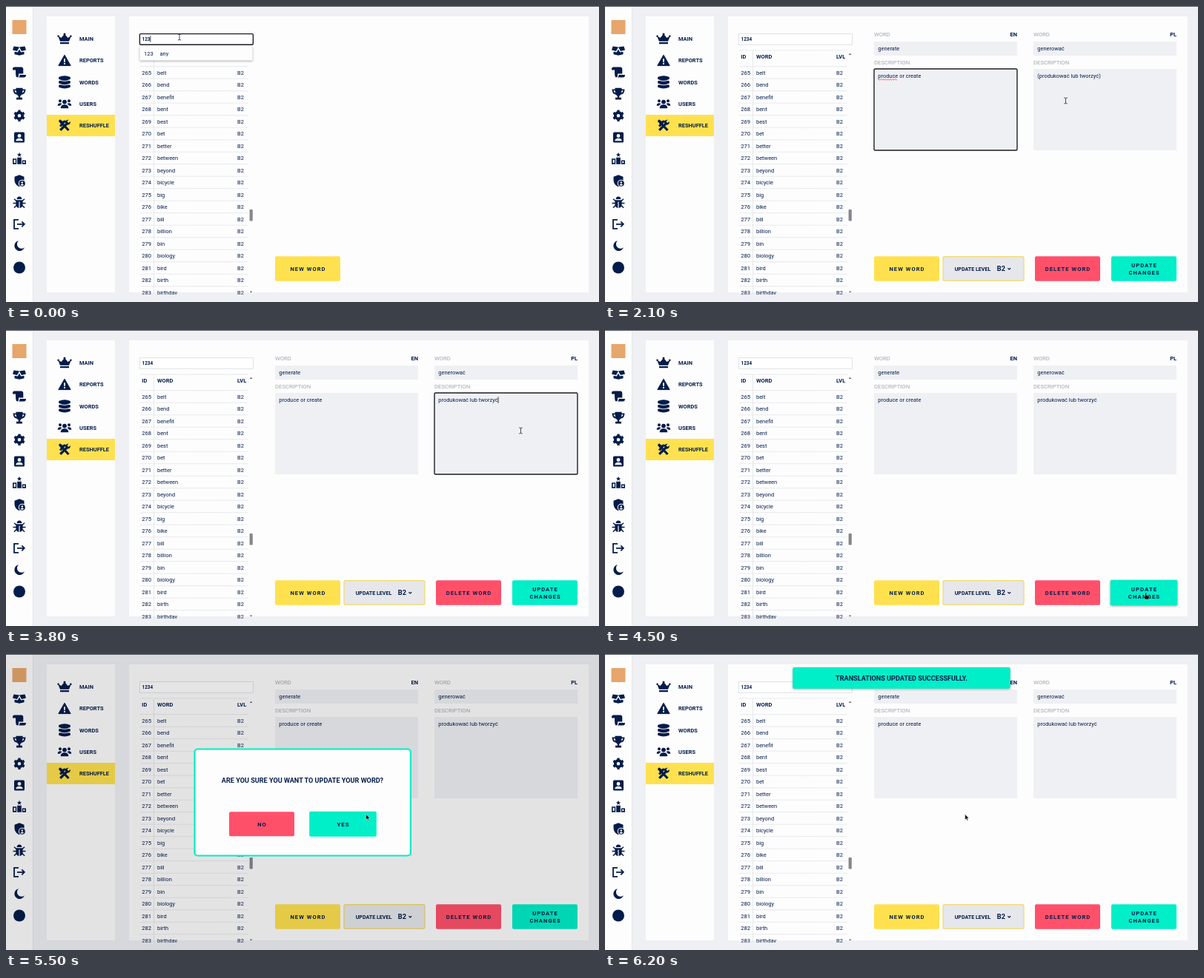
Animation of 800 by 400 pixels, one loop 6250 ms. Source, as an HTML page:

```html
<!DOCTYPE html>
<html lang="en">
<head>
<meta charset="utf-8">
<title>Word editor</title>
<style>
  html, body { margin: 0; width: 100%; height: 100%; overflow: hidden; background: #eff0f4; }
  svg { display: block; width: 800px; height: 400px; font: 7.45px Roboto, sans-serif; fill: #041c4a; }
  .b { font-weight: 700; }
  .btn { font-weight: 700; font-size: 7.6px; letter-spacing: 1.03px; text-anchor: middle; }
  .big { font-weight: 700; font-size: 9.1px; text-anchor: middle; }
  .label { fill: #a3a5ab; font-size: 7.7px; }
  .line { fill: none; stroke: #041c4a; stroke-width: 1.8; }
  .soft { filter: drop-shadow(0 1px 1.5px #0005); }
</style>
</head>
<body>
<svg id="stage" viewBox="0 0 800 400"></svg>
<script>
const LOOP = 6250;
const NAVY = '#041c4a', TEAL = '#00eec8', RED = '#ff506a', YELLOW = '#ffe14f', FIELD = '#eff0f4';

const text = (x, y, s, attrs = '') => `<text x="${x}" y="${y}" ${attrs}>${s}</text>`;
const rect = (x, y, w, h, fill, attrs = '') =>
  `<rect x="${x}" y="${y}" width="${w}" height="${h}" fill="${fill}" ${attrs}/>`;
const path = (d, attrs = '') => `<path d="${d}" ${attrs}/>`;
const circle = (x, y, r, attrs = '') => `<circle cx="${x}" cy="${y}" r="${r}" ${attrs}/>`;
const group = (id, body, attrs = '') => `<g id="${id}" ${attrs}>${body}</g>`;
const at = (x, y, body) => `<g transform="translate(${x} ${y})">${body}</g>`;
const mirror = body => body + `<g transform="scale(-1 1)">${body}</g>`;
const button = (x, y, w, h, fill, lines) =>
  rect(x, y, w, h, fill, 'rx="2"') +
  lines.map((s, i) => text(x + w / 2 + .5, y + h / 2 + 2.8 + (i - (lines.length - 1) / 2) * 9.4, s, 'class="btn"')).join('');

const star = 'M0-9 .9-6.9 3-6.7 1.4-5.3 1.9-3.2 0-4.3-1.9-3.2-1.4-5.3-3-6.7-.9-6.9Z';
const white = 'fill="#fdfdfe"';
const sideIcons = [
  mirror(path('M-7.5-5.8 0-4.8-3 .8-9-.8ZM-6.5 1.5V5L0 6.6V-1.8L-2.2 2.4Z')),
  path('M-6.5-7H2.5Q5.3-7 5.3-4V2H-1V5Q-1 7-3 7T-5-.5V-3H-9V-4.5Q-9-7-6.5-7ZM.6 3.4H9Q9 7 6 7H-1Q.6 6 .6 3.4Z'),
  path('M-4.5-8H4.5V-6.4H8.5Q8.5 0 3.2 1Q2 2.6 1.2 3V5H4V7.6H-4V5H-1.2V3Q-2 2.6-3.2 1Q-8.5 0-8.5-6.4H-4.5ZM-6.6-4.6Q-6-2.3-3.9-1.4L-4.5-4.6ZM6.6-4.6Q6-2.3 3.9-1.4L4.5-4.6Z', 'fill-rule="evenodd"'),
  circle(0, 0, 4.2, 'class="line" style="stroke-width:3.8"') +
    circle(0, 0, 6.4, 'class="line" style="stroke-width:2.6" pathLength="12" stroke-dasharray="1 1" stroke-dashoffset="-.5"'),
  rect(-7, -7, 14, 14, NAVY, 'rx="1.6"') + circle(0, -2, 2.4, white) + path('M-4.8 4.8Q-4.5 1.3 0 1.3T4.8 4.8Z', white),
  path(star + 'M-9-.6H-3.8V6.8H-9ZM-2.8-2.2H2.8V6.8H-2.8ZM3.8 1.6H9V6.8H3.8Z') +
    path('M-7.4 1H-5.2V5.2H-7.4ZM5.2 3.2H7.4V5.2H5.2Z', white),
  path('M0-8 6.5-5.4V-1Q6.5 5 0 8Q-6.5 5-6.5-1V-5.4Z') + circle(3.8, 3.6, 5, white) +
    circle(3.8, 3.6, 4) + circle(3.8, 2.3, 1.2, white) + path('M1.5 5.6Q3.8 3 6.1 5.6Q3.8 7.4 1.5 5.6Z', white),
  path('M-3.4-4.5Q-3.2-8 0-8T3.4-4.5ZM-4.6-3.3H4.6V3Q4 7 .6 7.5V-1H-.6V7.5Q-4 7-4.6 3Z') +
    mirror(path('M-4-2-7-4.8M-4 1H-8.5M-4 4-7 7.2', 'class="line" style="stroke-width:1.5"')),
  path('M-1-6H-7V6H-1M-3 0H6.5M3.3-3.5 6.8 0 3.3 3.5', 'class="line"'),
  path('M-1-7A7 7 0 1 0 7 2.2A6 6 0 0 1-1-7Z'),
  circle(0, 0, 8)
];
const navIcons = [
  path('M-6 3.5-8.8-3.6-4.4-1.4 0-6.5 4.4-1.4 8.8-3.6 6 3.5ZM-6 4.8H6V7H-6Z') +
    circle(0, -6.2, 1.5) + circle(-8.4, -3.6, 1.3) + circle(8.4, -3.6, 1.3),
  path('M0-7.4 8.2 7H-8.2Z', `stroke="${NAVY}" stroke-linejoin="round"`) + rect(-.9, -2.4, 1.8, 4.6, '#fff') + circle(0, 4.3, 1.1, white),
  [-5.4, 0, 5.4].map(y => path(`M-7.8 ${y - 1.4}Q0 ${y - 5} 7.8 ${y - 1.4}V${y + 1.5}Q0 ${y + 5} -7.8 ${y + 1.5}Z`)).join('') +
    path('M-7.8-3.2Q0 .2 7.8-3.2M-7.8 2.2Q0 5.6 7.8 2.2', 'fill="none" stroke="#fdfdfe" stroke-width=".9"'),
  circle(0, -2.6, 2.9) + path('M-5.3 6Q-5.3 1 0 1T5.3 6Z') +
    mirror(circle(-6, -4, 2) + path('M-9.3 2.5Q-9.3-1-6-1Q-4.4-1-3.6.2Q-5.5 1-6 2.5Z')),
  path('M5.5 6.5-4-3.5M-5.8 6.3 3.6-3', 'class="line" style="stroke-width:3.2"') +
    path('M-8.2-6-6-8.2-2.4-5.6V-2.4H-5.4ZM1-3.8Q1-8 5.6-7.8L3.4-5.4 5.4-3.4 7.9-5.5Q8.2-1 3.8-.8Z') +
    path('M-7 .2-2.4-6Q1-8.5 3-5L.2-3.8-4.6 2Z')
];

const words = 'belt bend benefit bent best bet better between beyond bicycle big bike bill billion bin biology bird birth birthday'.split(' ');
const rowLine = y => path(`M181 ${y}H327`, 'stroke="#d6d8dd" stroke-width=".7" stroke-dasharray="1.5 .5"');
const rows = words.map((w, i) => {
  const y = 92.8 + i * 16.5;
  return text(183.3, y, 265 + i, 'font-size="7.6"') + text(204, y, w) + text(312, y, 'B2') + rowLine(y + 5.4);
}).join('');

const column = (id, x, lang, word) =>
  text(x, 41.3, 'WORD', 'class="label"') + text(x + 193, 41.3, lang, 'class="b" text-anchor="end"') +
  rect(x, 48, 193, 19, FIELD) + text(x + 5.3, 60, word) +
  text(x, 78.7, 'DESCRIPTION', 'class="label"') +
  rect(x, 85, 193, 110, FIELD, `id="${id}Box" rx="1.5" stroke-width="1.3"`) +
  text(x + 5.3, 97.1, '', `id="${id}"`);

const stage = document.getElementById('stage');
stage.innerHTML =
  rect(0, 0, 800, 400, FIELD) + rect(36, 0, 1, 400, '#e4e6ea') + rect(0, 0, 36, 400, '#fdfdfe') +
  rect(55, 14, 92, 373, '#fdfdfe') + rect(166, 14, 620, 373, '#fdfdfe') + rect(0, 0, 800, 1, '#55575e') +
  rect(8.5, 19, 19, 19, '#e6a66c') +
  sideIcons.map((icon, i) => at(18, 60.2 + i * 29.33, icon)).join('') +
  rect(55, 147, 92, 29, YELLOW) +
  ['MAIN', 'REPORTS', 'WORDS', 'USERS', 'RESHUFFLE'].map((s, i) =>
    at(79, 44.3 + i * 29.3, navIcons[i]) + text(99, 47.1 + i * 29.3, s, 'class="b"')).join('') +
  `<clipPath id="clip"><rect x="175" y="50" width="165" height="339.8"/></clipPath><g clip-path="url(#clip)">` +
  text(183.3, 71.2, 'ID', 'class="b"') + text(204, 71.2, 'WORD', 'class="b"') + text(312, 71.2, 'LVL', 'class="b"') +
  rowLine(60) + rowLine(81.7) + rows + rect(199.2, 60, .7, 330, '#dcdee3') + '</g>' +
  path('M328.8 66 330.6 63.8 332.4 66ZM328.8 385.4H332.4L330.6 387.6Z', 'fill="#666"') +
  rect(328.6, 275, 4.2, 15.5, '#85878c', 'rx="1"') +
  rect(180.4, 37.6, 153, 14.6, '#fff', 'id="searchBox"') + text(183.5, 47.1, '', 'id="search" class="b" font-size="6.4"') +
  group('menu', rect(180.5, 54.5, 152, 19, '#fdfdfe', 'class="soft"') + rect(181, 55.2, 151, 17.8, TEAL, 'id="hover"') +
    text(186, 66.7, '', 'id="foundId" font-size="7.6"') + text(207.4, 66.7, '', 'id="found" font-size="7.6"')) +
  button(363, 338.3, 88, 33.4, YELLOW, ['NEW WORD']) +
  group('form', column('en', 363, 'EN', 'generate') + column('pl', 578, 'PL', 'generować') +
    path('M368.3 99.4' + 'q.8-1.5 1.6 0t1.6 0'.repeat(8), 'id="wave" fill="none" stroke="#f33" stroke-width=".8"') +
    rect(456, 338.6, 109, 32.6, '#e6e7eb', `rx="2" stroke="#f3d968" stroke-width="1.2"`) +
    text(471.7, 357.6, 'UPDATE LEVEL', 'class="b" font-size="7.1"') + text(528.8, 358.2, 'B2', 'class="b" font-size="9.2"') +
    path('M543.4 354.2 545.3 356 547.2 354.2', 'class="line" style="stroke-width:1.2"') +
    button(580, 338.3, 88, 33.4, RED, ['DELETE WORD']) +
    group('update', button(683, 338.3, 88, 33.4, TEAL, ['UPDATE', 'CHANGES']))) +
  rect(0, 0, .8, 8.6, '#111', 'id="caret"') +
  group('modal', rect(0, 0, 800, 400, '#000', 'opacity=".1"') +
    rect(254.5, 128.5, 291.4, 144, '#fdfdfe', `rx="4" stroke="${TEAL}" stroke-width="2.2"`) +
    text(400, 174.3, 'ARE YOU SURE YOU WANT TO UPDATE YOUR WORD?', 'class="big"') +
    button(301, 213.2, 88, 33, RED, ['NO']) +
    group('yes', button(410.5, 213.2, 88, 33, TEAL, ['YES']))) +
  group('toast', rect(253.3, 18, 293.4, 28.8, TEAL, 'rx="2" class="soft"') +
    text(400, 35.9, 'TRANSLATIONS UPDATED SUCCESSFULLY.', 'class="big"')) +
  group('cursor',
    path('M-2.2-4Q0-4 0-3Q0-4 2.2-4M0-3V3M-2.2 4Q0 4 0 3Q0 4 2.2 4', 'id="beam" fill="none" stroke="#333" stroke-width=".9"') +
    path('M-.9 0Q0-1 .9 0V3L4 3.8Q4.6 4.2 4.4 5.5L3.6 8.3H-.8L-3.2 5Q-2.8 4-1 5Z', 'id="hand" fill="#111" stroke="#fff" stroke-width=".3"') +
    path('M0 0V7.6L1.8 6 3 8.7 4.3 8.1 3.1 5.5H5.5Z', 'id="arrow" fill="#111" stroke="#fff" stroke-width=".5"'));

const el = {};
stage.querySelectorAll('[id]').forEach(e => el[e.id] = e);
const show = (name, on) => el[name].setAttribute('visibility', on ? 'visible' : 'hidden');
const write = (name, s) => { if (el[name].textContent !== s) el[name].textContent = s; };
const inside = (p, x, y, w, h) => p.x >= x && p.x <= x + w && p.y >= y && p.y <= y + h;

// Pointer stops: time, x, y
const stops = [[0, 234, 42], [400, 234, 42], [850, 238.7, 65.8], [1020, 238.7, 65.8], [1320, 452, 118], [1720, 452, 118],
  [2100, 621.5, 128], [2420, 691, 114.6], [3700, 691, 114.6], [4250, 729.6, 355.6], [4680, 729.6, 355.6], [5250, 485.6, 216.6], [LOOP, 485.6, 216.6]];
function pointer(t) {
  const i = stops.findIndex(s => s[0] > t), [t0, x0, y0] = stops[i - 1], [t1, x1, y1] = stops[i];
  const k = (t - t0) / (t1 - t0), e = k * k * (3 - 2 * k);
  return { x: x0 + (x1 - x0) * e, y: y0 + (y1 - y0) * e };
}

// Caret states: start time, field, characters before the caret
const carets = [[0, 'search', 3], [200, 'search', 4], [900], [1320, 'en', 1], [1420, 'en', 0], [1500, 'en', 17], [1580, 'en', 17],
  [2440, 'pl', 23], [2700, 'pl', 1], [3150, 'pl', 0], [3300, 'pl', 22], [3450, 'pl', 22], [4450]];

const trimmed = (s, t, first, last) => (t < first ? '(' : '') + s + (t < last ? ')' : '');
const grow = (name, on, x, y) =>
  el[name].setAttribute('transform', on ? `translate(${x} ${y}) scale(1.03) translate(${-x} ${-y})` : '');

function focusBox(name, on, idle, width) {
  el[name].setAttribute('stroke', on ? '#1c1e24' : idle);
  el[name].setAttribute('stroke-width', on ? 1.4 : width);
  el[name].setAttribute('rx', on ? 1.5 : 0);
}

function render(t) {
  const p = pointer(t), typed = t >= 200, form = t >= 1050, modal = t >= 4550 && t < 5700;
  write('search', typed ? '1234' : '123');
  write('foundId', typed ? '1234' : '123');
  write('found', typed ? 'generate' : 'any');
  write('en', trimmed('produce or create', t, 1420, 1580));
  write('pl', trimmed('produkować lub tworzyć', t, 3150, 3450));

  const onItem = !form && inside(p, 181, 55, 151, 18);
  const onUpdate = form && !modal && inside(p, 683, 338, 88, 34);
  show('menu', !form);
  show('hover', onItem);
  show('form', form);
  show('wave', t >= 1600 && t < 2440);
  show('modal', modal);
  show('toast', t >= 5800);
  grow('update', onUpdate, 727, 355);
  el.update.setAttribute('class', onUpdate ? 'soft' : '');
  grow('yes', inside(p, 410, 213, 88, 34), 454.5, 229.7);

  const [since, field, count] = carets.filter(c => c[0] <= t).pop();
  focusBox('searchBox', field === 'search', '#d9dbe0', .8);
  focusBox('enBox', field === 'en', 'none', 0);
  focusBox('plBox', field === 'pl', 'none', 0);
  show('caret', field && (t - since) % 1000 < 500);
  if (field) {
    const box = el[field];
    const x = +box.getAttribute('x') + (count ? box.getSubStringLength(0, Math.min(count, box.textContent.length)) : 0);
    el.caret.setAttribute('x', x);
    el.caret.setAttribute('y', box.getAttribute('y') - 6.8);
  }

  const onText = inside(p, 180, 37, 153, 15) || form && !modal && t < 4550 &&
    [363, 578].some(x => inside(p, x, 48, 193, 19) || inside(p, x, 85, 193, 110));
  const hand = onItem || onUpdate;
  show('beam', onText);
  show('hand', hand);
  show('arrow', !onText && !hand);
  el.cursor.setAttribute('transform', `translate(${p.x} ${p.y})`);
}

const start = performance.now();
function tick() {
  render((performance.now() - start) % LOOP);
  requestAnimationFrame(tick);
}
tick();
</script>
</body>
</html>
```
